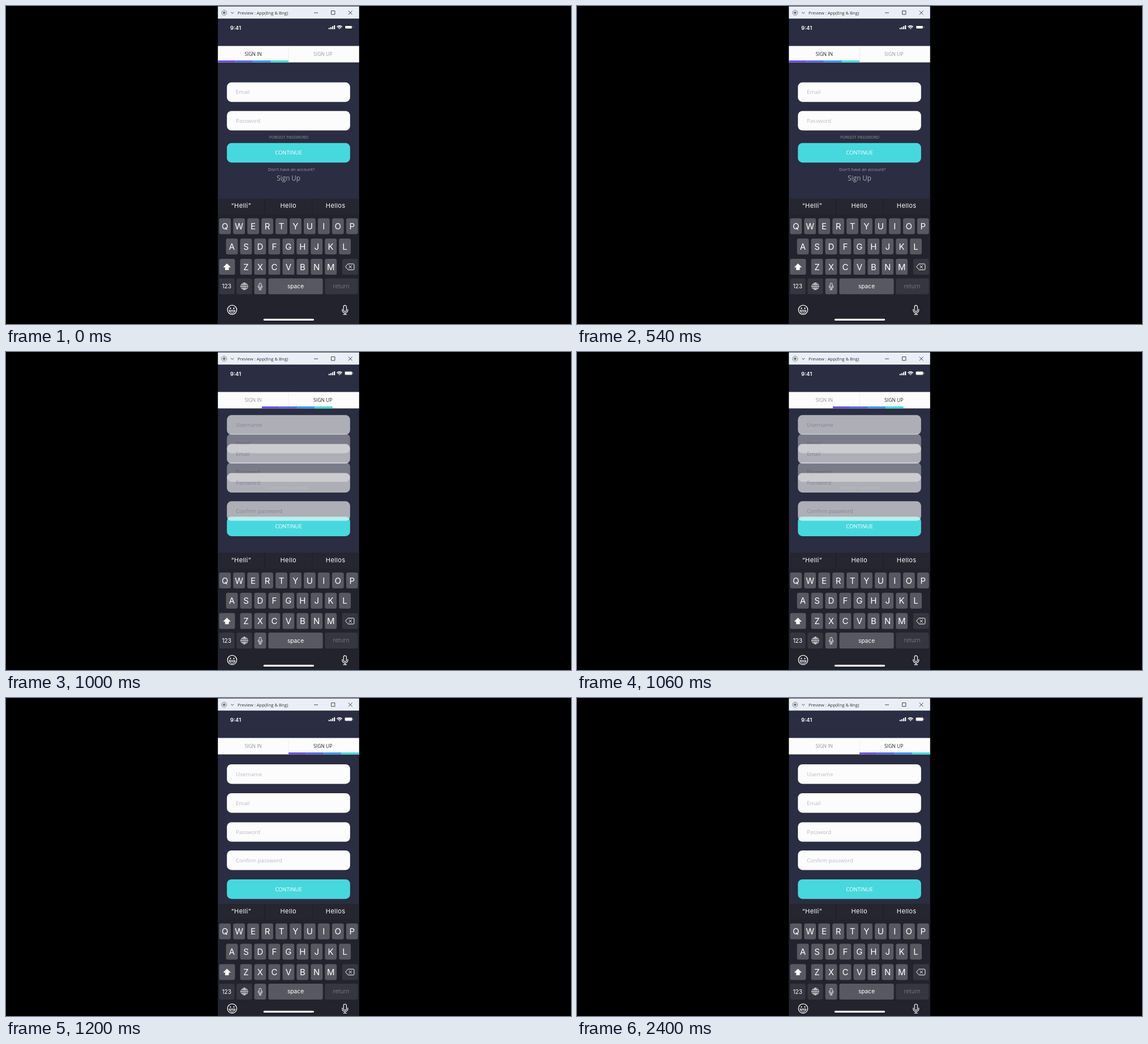
Write an HTML page that moves like this. It is 998 by 561 pixels and loops after 3200 ms.

```html
<!DOCTYPE html>
<html lang="en">
<head>
<meta charset="utf-8">
<title>Sign in / sign up</title>
<style>
  html, body { margin: 0; width: 100%; height: 100%; overflow: hidden; background: #000; }
  svg { display: block; width: 998px; height: 561px; }
  text { font-family: "Open Sans", "Noto Sans", sans-serif; }
  .ios text, text.ios { font-family: Inter, Roboto, sans-serif; }
  .line { fill: none; stroke: #fff; stroke-linecap: round; stroke-linejoin: round; }
</style>
</head>
<body>
<svg id="stage" viewBox="0 0 998 561" xmlns="http://www.w3.org/2000/svg"></svg>
<script>
const LOOP = 3200, STEP = 100;
const TAP = 900, EASE_START = 914, EASE_TIME = 310;

const rect = (x, y, w, h, fill, r = 0, extra = '') =>
  `<rect x="${x}" y="${y}" width="${w}" height="${h}" rx="${r}" fill="${fill}" ${extra}/>`;

// Text whose capitals are centred vertically on cy.
const label = (x, cy, size, fill, str, extra = 'text-anchor="middle"') =>
  `<text x="${x}" y="${cy + size * 0.36}" font-size="${size}" fill="${fill}" ${extra}>${str}</text>`;

const line = (d, width = 1, extra = '') =>
  `<path class="line" d="${d}" stroke-width="${width}" ${extra}/>`;

const field = (y, hint) =>
  rect(390.2, y, 217.6, 34.4, '#fcfcfc', 8) + label(406, y + 17.2, 9.6, '#b9bbc4', hint, '');

const LIGHT = '#575861', DARK = '#353640';

const letterRow = (letters, firstX, y) => [...letters].map((c, i) => {
  const x = firstX + i * 24.95;
  return rect(x - 10.4, y, 20.8, 28, LIGHT, 3.2) + label(x, y + 14.2, 15, '#fff', c);
}).join('');

const mic = (x, y, scale) => `<g transform="translate(${x} ${y}) scale(${scale})">` +
  line('M-2.6 -5.2a2.6 2.6 0 0 1 5.2 0v5.6a2.6 2.6 0 0 1 -5.2 0z' +
       'M-4.9 -1v1.6a4.9 4.9 0 0 0 9.8 0v-1.6M0 5.6v2.6M-2.8 8.2h5.6', 1.2) + '</g>';

function titleBar() {
  const grey = 'stroke="#333"';
  return rect(374.3, 0.8, 249.4, 21.4, '#e9eff7') +
    '<circle cx="385.3" cy="11.8" r="4.5" fill="none" stroke="#777" stroke-width=".9"/>' +
    '<circle cx="385.3" cy="11.8" r="2.4" fill="#777"/>' +
    `<path d="M397.2 10.8l2.5 2.4l2.5 -2.4M544 12h7M574.5 8.5h6.4v6.4h-6.4zM604.8 8.4l6.8 6.8M611.6 8.4l-6.8 6.8"
      fill="none" ${grey} stroke-width=".9"/>` +
    label(409, 11.9, 7.7, '#333', 'Preview : App(Eng &amp; Bng)', '');
}

function statusBar() {
  const bars = [2.4, 3.8, 5.4, 7].map((h, i) => rect(569.8 + i * 3.1, 41 - h, 2.1, h, '#fff', 0.5)).join('');
  return label(396, 38.6, 9.5, '#fff', '9:41', 'class="ios" font-weight="600"') + bars +
    line('M584.9 36.4a6 6 0 0 1 8.4 0M586.6 38.2a3.6 3.6 0 0 1 5 0', 1.4, 'stroke-linecap="butt"') +
    '<path d="M587.6 39.6a2.2 2.2 0 0 1 3 0l-1.5 1.5z" fill="#fff"/>' +
    rect(598.6, 34.4, 12.8, 5.9, '#fff', 1.4, 'id="battery" stroke-width="1"') +
    rect(612.3, 36, 0.9, 2.6, '#a5a6b0', 0.4);
}

function tabs() {
  const colors = ['#6a54d6', '#586bdd', '#4096e6', '#47d8dc'];
  return rect(374.3, 70.5, 249.4, 29, '#fcfcfc') + rect(498.7, 70.5, 0.7, 29, '#e6e6e8') +
    label(436.7, 85.3, 8.5, '', 'SIGN IN', 'id="tabIn" text-anchor="middle"') +
    label(559.7, 85.3, 8.5, '', 'SIGN UP', 'id="tabUp" text-anchor="middle"') +
    '<g id="underline">' +
    colors.map((c, i) => rect(374.3 + i * 31.17, 96, 31.2, 3.6, c)).join('') + '</g>';
}

function forms() {
  return '<g id="signIn">' + field(134.8, 'Email') + field(185.2, 'Password') +
    label(499.5, 230.9, 7.25, '#8f909c', 'FORGOT PASSWORD') +
    label(504, 287.9, 7.6, '#9c9da8', "Don't have an account?") +
    label(499.2, 303.8, 11.7, '#acadb7', 'Sign Up') + '</g>' +
    '<g id="continue">' + rect(390.2, 241.8, 217.6, 34.4, '#47d8dd', 8) +
    label(499, 259, 9.5, '#fff', 'CONTINUE') + '</g>' +
    '<g id="signUp">' + field(117, 'Username') + field(168, 'Email') +
    field(219.2, 'Password') + field(269, 'Confirm password') + '</g>';
}

function keyboard() {
  const words = ['“Helli”', 'Hello', 'Hellos'].map((w, i) =>
    label(415.4 + i * 83.4, 352.5, 11, '#fff', w, 'text-anchor="middle" letter-spacing=".4"')).join('');
  const globe = line('M414.9 494.5a6.1 6.1 0 1 0 12.2 0a6.1 6.1 0 1 0 -12.2 0zM421 488.4v12.2' +
    'M414.9 494.5h12.2M421 488.4c-4 3.4 -4 8.8 0 12.2c4 -3.4 4 -8.8 0 -12.2M416.2 491.2h9.6M416.2 497.8h9.6', 0.8);
  return '<g id="keyboard" class="ios">' +
    rect(374.3, 340, 249.4, 240, '#22232d') + rect(374.3, 340, 249.4, 27.5, '#252630') +
    rect(456.6, 341, 0.8, 26, '#1b1c25') + rect(540.4, 341, 0.8, 26, '#1b1c25') + words +
    letterRow('QWERTYUIOP', 386.7, 374.5) +
    letterRow('ASDFGHJKL', 399, 410.2) +
    letterRow('ZXCVBNM', 424, 446.1) +
    rect(376.4, 446.1, 28, 28, LIGHT, 3.2) +
    '<path d="M390.3 454.6l6.2 6.2h-3.2v4.6h-6v-4.6h-3.2z" fill="#fff" stroke="#fff" stroke-width=".6" stroke-linejoin="round"/>' +
    rect(593.8, 446.1, 27.9, 28, DARK, 3.2) +
    line('M604.3 455h9a1.6 1.6 0 0 1 1.6 1.6v7.2a1.6 1.6 0 0 1 -1.6 1.6h-9l-4.4 -5.2zM605.8 457.8l4.8 4.8M610.6 457.8l-4.8 4.8', 1) +
    rect(376.4, 480.6, 27.2, 28, DARK, 3.2) + label(389.8, 494.8, 10.2, '#fff', '123') +
    rect(407.2, 480.6, 27.3, 28, DARK, 3.2) + globe +
    rect(438.6, 480.6, 20.9, 28, LIGHT, 3.2) + mic(449, 494.6, 0.74) +
    rect(463.4, 480.6, 96.2, 28, LIGHT, 3.2) + label(511.5, 494.5, 10.2, '#fff', 'space') +
    rect(563.3, 480.6, 58.4, 28, DARK, 3.2) + label(592, 494.2, 10.2, '#71727b', 'return') + '</g>' +
    '<g id="bottomIcons">' +
    '<circle class="line" cx="399.4" cy="536" r="8.2" stroke-width="1.3"/>' +
    '<circle cx="396.4" cy="533.3" r="1.2" fill="#fff"/><circle cx="402.4" cy="533.3" r="1.2" fill="#fff"/>' +
    line('M394.2 536.8h10.4a5.2 5.2 0 0 1 -10.4 0zM394.9 538.8h9', 1) +
    mic(598.8, 536, 1) + '</g>' +
    rect(454.8, 551.7, 89.2, 3.2, '#fff', 1.6);
}

const $ = id => document.getElementById(id);
$('stage').innerHTML = rect(374.3, 0, 249.4, 561, '#2b2d42') +
  titleBar() + statusBar() + tabs() + forms() + keyboard();

const move = (id, x, y) => $(id).setAttribute('transform', `translate(${x} ${y})`);
const set = (id, name, value) => $(id).setAttribute(name, value);

function draw(ms) {
  const t = Math.floor((ms % LOOP) / STEP) * STEP;   // ten pictures a second
  const u = Math.min(1, Math.max(0, (t - EASE_START) / EASE_TIME));
  const p = t >= 1200 ? 1 : 1 - (1 - u) ** 3;
  const tapped = t >= TAP;

  set('tabIn', 'fill', tapped ? '#98989c' : '#2c2c30');
  set('tabUp', 'fill', tapped ? '#2c2c30' : '#98989c');
  set('battery', 'stroke', tapped ? '#85868f' : '#08080c');
  set('signIn', 'opacity', 1 - p);
  set('signUp', 'opacity', p);
  move('underline', 124.7 * p, 0);
  move('signIn', 0, 15 * p);
  move('signUp', 0, -15 * (1 - p));
  move('continue', 0, 78.2 * p);
  move('keyboard', 0, 23.3 * p);
  move('bottomIcons', 0, 11.8 * p);
}

const start = performance.now();
function tick() {
  draw(performance.now() - start);
  requestAnimationFrame(tick);
}
tick();
</script>
</body>
</html>
```
